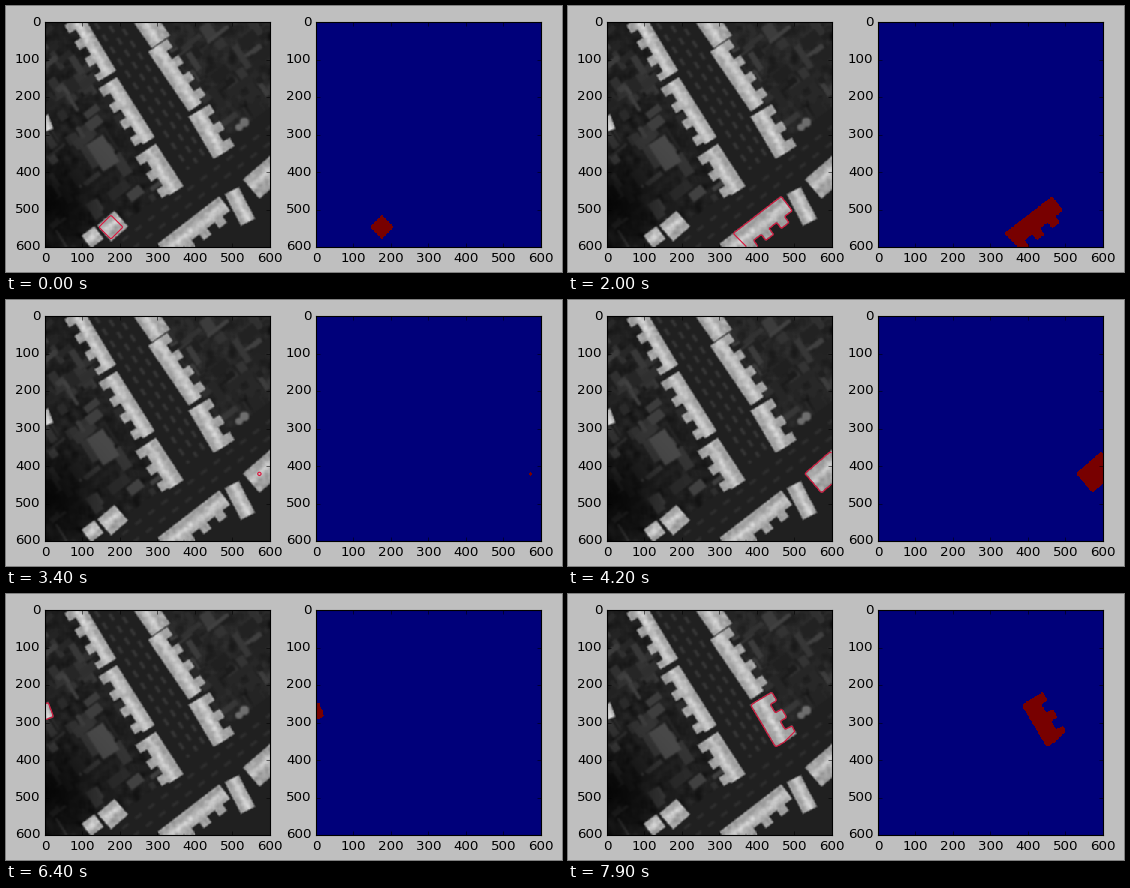
A matplotlib script that plays this animation: 556 px wide and 266 px high, repeating every 8000 ms.

```python
import numpy as np
import matplotlib.pyplot as plt
from matplotlib.animation import FuncAnimation
from matplotlib.colors import ListedColormap
from matplotlib.transforms import ScaledTranslation

SIZE, N = 600, 300
FRAMES, STEP_MS = 80, 100
BAY, BITE = 26, 20          # rhythm and depth of the stepped backs
HEADING, CROSSING = 57.5, -37.6

plt.rcParams.update({"font.family": "DejaVu Sans", "font.size": 12,
                     "axes.linewidth": 1.0})

rng = np.random.default_rng(4)
centres = (np.arange(N) + 0.5) * SIZE / N
X, Y = np.meshgrid(centres, centres)


def local(x, y, angle):
    """Distances along and across a heading, measured from (x, y)."""
    c, s = np.cos(np.radians(angle)), np.sin(np.radians(angle))
    return (X - x) * c + (Y - y) * s, (Y - y) * c - (X - x) * s


def blur(a, width):
    """Separable box blur with edge padding."""
    half = width // 2
    kernel = np.ones(width) / width
    for axis in (0, 1):
        pad = [(half, half) if i == axis else (0, 0) for i in (0, 1)]
        a = np.apply_along_axis(np.convolve, axis, np.pad(a, pad, mode="edge"),
                                kernel, "valid")
    return a


def noise(width):
    a = blur(rng.normal(0, 1, (N, N)), width)
    return a / a.std()


def building(x, y, angle, length, depth):
    """Straight front from (x, y); long ones have every other bay set back."""
    along, across = local(x, y, angle)
    across = across * np.sign(depth)
    depth = abs(depth)
    set_back = (along // BAY % 2 == 1) & (length > 100)
    mask = ((along >= 0) & (along <= length) & (across >= 0)
            & (across <= depth - BITE * set_back))
    ridge = np.exp(-((across - 0.42 * depth) / 11) ** 2)
    return mask, 160 + 42 * ridge


# x, y, heading, length, signed depth
BUILDINGS = {
    "west 1": building(100, -20, 59, 175, 56),
    "west 2": building(192, 147, 57.7, 189, 58),
    "west 3": building(296, 325, 56.8, 135, 66),
    "east 1": building(232, -5, 55, 92, -60),
    "east 2": building(275, 80, 55.7, 193, -62),
    "east 3": building(383, 253, 59.3, 131, -66),
    "south 1": building(300, 592, CROSSING, 208, 68),
    "south 2": building(517, 440, 63, 95, 42),
    "south 3": building(528, 420, -40.7, 95, 68),
    "corner": building(140, 543, -41, 60, 56),
    "annex": building(98, 570, -37, 42, 42),
    "edge": building(9, 247, 70, 40, 30),
}


def height_map():
    street_u, street_v = local(0, 0, HEADING)
    cross_u, cross_v = local(0, 0, CROSSING)
    west = (street_v > -50) & (cross_v < 555)
    east = (street_v < -240) & (cross_v < 545)

    # Ground: flat streets, uneven gardens, a dark hollow to the south-west
    z = np.full((N, N), 33.0)
    z[west] = 30
    z[east] = 37
    z[west | east] += (5 * noise(9))[west | east]

    # Sheds, hedges and low roofs, all lined up with the streets
    for garden, count in ((west, 75), (east, 55)):
        rows, cols = np.nonzero(garden)
        for k in rng.integers(0, len(rows), count):
            along, across = local(centres[cols[k]], centres[rows[k]],
                                  rng.choice([HEADING, CROSSING]))
            shape = ((abs(along) < rng.uniform(8, 36))
                     & (abs(across) < rng.uniform(2, 16)) & garden)
            z[shape] = rng.uniform(26, 68)
    along, across = local(155, 350, HEADING)
    z[(abs(along) < 42) & (abs(across) < 26)] = 74
    z *= 1 - 0.75 * np.exp(-(X ** 2 + (Y - 490) ** 2) / (2 * 85 ** 2))

    # Parked cars in rows
    for v in (-166, -140, -112):
        z[(abs(street_v - v) < 4) & ((street_u + v) % 38 < 20)
          & (cross_v < 545)] = 55
    for v in (588, 622):
        z[(abs(cross_v - v) < 3.5) & ((cross_u + v) % 44 < 20)
          & (X > 200)] = 48
    for x, y, r in ((532, 268, 13), (518, 281, 10)):
        z[np.hypot(X - x, Y - y) < r] = 110

    z = blur(z, 3)
    grain = 8 * noise(5)
    for mask, roof in BUILDINGS.values():
        z[mask] = (roof + grain)[mask]
    return np.clip(blur(z, 3), 0, 255)


# Growing regions: first step, seed, building that stops the growth
REGIONS = [
    (-3, (176, 547), "corner"),
    (8, (428, 532), "south 1"),
    (22, (522, 494), "south 2"),
    (34, (572, 421), "south 3"),
    (45, (314, 395), "west 3"),
    (60, (8, 272), "edge"),
    (70, (437, 295), "east 3"),
]


def region(i):
    """Diamond spreading from the seed at a steady rate within its roof."""
    start, (cx, cy), name = [r for r in REGIONS if r[0] <= i][-1]
    radius = max(5, 2 + 10 * (i - start))
    grown = BUILDINGS[name][0] & (abs(X - cx) + abs(Y - cy) <= radius)
    return blur(grown.astype(float), 3)


fig = plt.figure(figsize=(556 / 80, 266 / 80), dpi=80, facecolor="0.75")
EXTENT = (0, SIZE, SIZE, 0)


def panel(left, image, cmap, top):
    ax = fig.add_axes([left / 556, 25 / 266, 225 / 556, 225 / 266])
    shown = ax.imshow(image, cmap=cmap, vmin=0, vmax=top, extent=EXTENT,
                      interpolation="nearest", aspect="auto")
    ax.set_xticks(range(0, SIZE + 1, 100))
    ax.set_yticks(range(0, SIZE + 1, 100))
    ax.tick_params(direction="in", top=True, right=True, length=4, width=0.5,
                   pad=4)
    ax.tick_params(axis="x", pad=4.6)
    lift = ScaledTranslation(0, 1.5 / 80, fig.dpi_scale_trans)
    for label in ax.get_yticklabels():
        label.set_transform(label.get_transform() + lift)
    return ax, shown


photo, _ = panel(38.9, height_map(), "gray", 255)
_, mask_image = panel(309.9, np.zeros((N, N)),
                      ListedColormap(["#00007a", "#780000"]), 1)
outlines = []


def update(i):
    while outlines:
        outlines.pop().remove()
    u = region(i)
    outlines.append(photo.contour(X, Y, u, [0.5], colors="crimson",
                                  linewidths=1))
    photo.set_xlim(0, SIZE)
    photo.set_ylim(SIZE, 0)
    mask_image.set_data((u > 0.5).astype(float))
    return [mask_image]


anim = FuncAnimation(fig, update, frames=FRAMES, interval=STEP_MS,
                     init_func=lambda: [mask_image], repeat=True,
                     repeat_delay=0)
plt.show()
```
